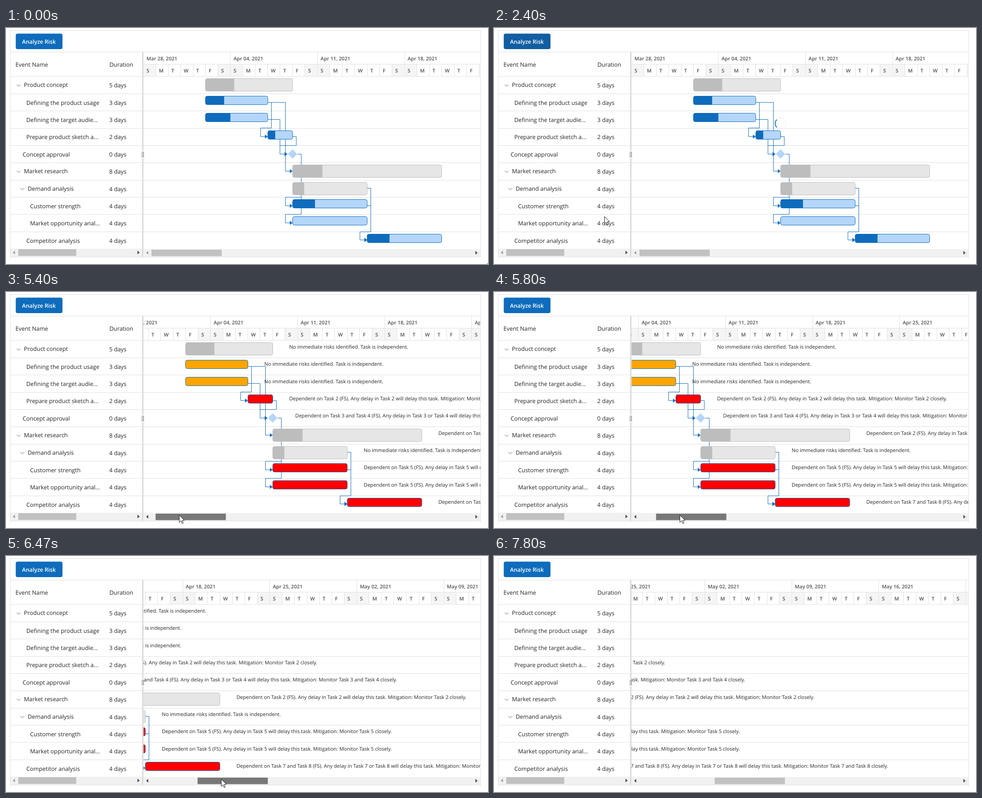
An HTML page with a canvas that plays this animation: 1067 px wide and 525 px high, repeating every 8940 ms.

```html
<!DOCTYPE html>
<html lang="en">
<head>
<meta charset="utf-8">
<title>Gantt risk analysis</title>
<style>
  html, body { margin: 0; width: 100%; height: 100%; overflow: hidden; background: #fff; }
  canvas { display: block; }
</style>
</head>
<body>
<canvas id="stage" width="1067" height="525"></canvas>
<script>
const ctx = document.getElementById('stage').getContext('2d');
ctx.textRendering = 'geometricPrecision';

const LOOP = 8940, STEP = 1000 / 15, SCROLL_RATIO = 4.81;
const LEFT = 304, RIGHT = 1050, DAY = 27.525, ROW_TOP = 107.95, ROW = 38.36;
const BLUE = '#0f6cbd', PALE = '#b4d6fa', INK = '#242424', LINE = '#e0e0e0';
const ARROW_ON = '#505050', ARROW_OFF = '#a3a3a3', THUMB = '#c1c1c1';
const FONT = '"Open Sans", "Noto Sans", sans-serif';

// start and end are days from Sunday, Mar 28; after holds the indices of the predecessors
const tasks = [
  { name: 'Product concept', level: 0, start: 5, end: 12, done: .33, parent: true },
  { name: 'Defining the product usage', level: 1, start: 5, end: 10, done: .3 },
  { name: 'Defining the target audie...', level: 1, start: 5, end: 10, done: .4 },
  { name: 'Prepare product sketch a...', level: 1, start: 10, end: 12, done: .3, after: [1] },
  { name: 'Concept approval', level: 0, start: 12, end: 12, milestone: true, after: [2, 3] },
  { name: 'Market research', level: 0, start: 12, end: 24, done: .2, parent: true, after: [1] },
  { name: 'Demand analysis', level: 1, start: 12, end: 18, done: .155, parent: true },
  { name: 'Customer strength', level: 2, start: 12, end: 18, done: .3, after: [4] },
  { name: 'Market opportunity anal...', level: 2, start: 12, end: 18, done: 0, after: [4] },
  { name: 'Competitor analysis', level: 1, start: 18, end: 24, done: .3, after: [6, 7] }
];
tasks.forEach((task, i) => {
  task.top = ROW_TOP + i * ROW;
  task.mid = task.top + 18.8;
  task.x = LEFT + task.start * DAY;
  task.width = (task.end - task.start) * DAY;
  task.days = 0;
  for (let d = task.start; d < task.end; d++) if (d % 7 % 6) task.days++;
  task.note = riskNote(task.after);
});

function riskNote(after) {
  if (!after) return 'No immediate risks identified. Task is independent.';
  const names = after.map(i => `Task ${i + 1}`), all = names.join(' and ');
  return `Dependent on ${all} (FS). Any delay in ${names.join(' or ')} will delay this task. Mitigation: Monitor ${all} closely.`;
}

// pointer moves: [from time, to time, x, y]; between them it rests
const moves = [
  [0, 200, 219, 243], [333, 1067, 95, 32], [1533, 2400, 244, 419],
  [2470, 3400, 302, 493], [4000, 4267, 377, 481], [4267, 4667, 374, 496]
];
// timeline drag: [time, scrolled pixels]
const drag = [[5267, 0], [5800, 177], [6467, 491], [7000, 700], [7400, 801]];

const progress = (t, from, to) => Math.min(1, Math.max(0, (t - from) / (to - from)));
const smooth = k => k * k * (3 - 2 * k);
const snap = v => Math.floor(v) + .5;

const scrollAt = t => Math.round(drag.slice(1).reduce((sum, [time, px], i) =>
  sum + (px - drag[i][1]) * progress(t, drag[i][0], time), 0));

function pointerAt(t) {
  let x = 1066, y = 523;
  for (const [from, to, toX, toY] of moves) {
    const k = smooth(progress(t, from, to));
    x += (toX - x) * k;
    y += (toY - y) * k;
  }
  return [Math.round(x + scrollAt(t) / SCROLL_RATIO), Math.round(y)];
}

function rect(x, y, w, h, fill) {
  ctx.fillStyle = fill;
  ctx.fillRect(x, y, w, h);
}
function text(s, x, y, size, fill = INK, weight = 400) {
  ctx.font = `${weight} ${size}px ${FONT}`;
  ctx.fillStyle = fill;
  ctx.fillText(s, x, Math.round(y));
}
function poly(points, fill, stroke, close = true) {
  ctx.beginPath();
  points.forEach(([x, y]) => ctx.lineTo(x, y));
  if (close) ctx.closePath();
  if (fill) { ctx.fillStyle = fill; ctx.fill(); }
  if (stroke) { ctx.strokeStyle = stroke; ctx.stroke(); }
}
function arc(radius, from, to, stroke, width) {
  ctx.beginPath();
  ctx.arc(634.5, 212.5, radius, from, to);
  ctx.strokeStyle = stroke;
  ctx.lineWidth = width;
  ctx.stroke();
}
const arrow = (x, y, dir, fill) => poly([[x + 3 * dir, y], [x - 2 * dir, y - 4], [x - 2 * dir, y + 4]], fill);

function bar(task, dy, h, fill, edge, doneFill) {
  const x = snap(task.x), y = snap(task.top + dy), w = snap(task.x + task.width) - x;
  ctx.beginPath();
  ctx.roundRect(x, y, w, h, 4);
  ctx.fillStyle = fill;
  ctx.fill();
  if (doneFill) {
    ctx.save();
    ctx.clip();
    rect(x, y, w * task.done, h, doneFill);
    ctx.restore();
  }
  ctx.strokeStyle = edge;
  ctx.stroke();
}

function drawTimeline() {
  const first = Date.UTC(2021, 2, 28);
  for (let d = 0; d < 70; d++) {
    const x = LEFT + d * DAY, px = Math.floor(x), weekday = d % 7;
    if (weekday % 6 === 0) rect(px, 81, DAY, 26, '#f5f5f5');
    if (d) rect(px, weekday ? 81 : 54, 1, weekday ? 26 : 53, LINE);
    text('SMTWTFS'[weekday], x + 7, 99, 11.2, ARROW_ON, 600);
    if (!weekday) {
      const date = new Date(first + d * 864e5);
      const month = ['Mar', 'Apr', 'May', 'Jun'][date.getUTCMonth() - 2];
      text(`${month} ${String(date.getUTCDate()).padStart(2, '0')}, 2021`, x + 7, 72, 11.1, ARROW_ON, 600);
    }
  }
}

// elbow from the end of one task to the start of another, with a detour when there is no room
function drawLink(from, to) {
  const inset = task => task.milestone ? 11.5 : 0;
  const startX = from.x + from.width + inset(from), tip = to.x - inset(to);
  const outX = startX + 8, backX = tip - 16;
  const detour = backX > outX ? [] : [[outX, from.mid], [outX, to.top - .1], [backX, to.top - .1]];
  const entry = detour.length ? [] : [[backX, from.mid]];
  const route = [[startX, from.mid], ...detour, ...entry, [backX, to.mid], [tip - 5, to.mid]];
  poly(route.map(point => point.map(snap)), null, BLUE, false);
  const y = snap(to.mid);
  poly([[tip, y], [tip - 6, y - 4.5], [tip - 6, y + 4.5]], BLUE);
}

function drawTask(task, analyzed) {
  const { x, mid } = task;
  if (task.milestone) {
    poly([[x, mid - 10.5], [x + 10.5, mid], [x, mid + 10.5], [x - 10.5, mid]], PALE);
  } else if (task.parent) {
    bar(task, 4.95, 28, '#e6e6e6', '#bdbdbd', '#bdbdbd');
  } else if (analyzed) {
    bar(task, 5.1, 19, task.after ? '#f00' : '#ffa500', BLUE);
  } else {
    bar(task, 5.1, 19, PALE, BLUE, BLUE);
  }
  if (analyzed) text(task.note, x + task.width + (task.milestone ? 50 : 36.6), task.top + 17.9, 11.1);
}

function drawGrid() {
  text('Event Name', 21, 86, 12.8);
  text('Duration', 229, 86, 12.8);
  tasks.forEach((task, i) => {
    const x = 36.8 + task.level * 8.2, y = 132.4 + i * ROW;
    text(task.name, task.parent ? x + 3 : x, task.parent ? y - 1 : y, 12.8);
    text(`${task.days} days`, 228.5, y, 12.8);
    if (task.parent) poly([[x - 13, y - 6.5], [x - 9, y - 2.5], [x - 5, y - 6.5]], null, '#616161', false);
  });
}

function drawScrollbars(thumb, thumbFill) {
  rect(10, 491, 291, 18, '#f1f1f1');
  rect(27, 492, 128.5, 15, THUMB);
  arrow(18, 499.5, -1, ARROW_OFF);
  arrow(293, 499.5, 1, ARROW_ON);
  rect(305, 492, 745, 17, '#f1f1f1');
  rect(322 + thumb, 493, 155.5, 14.5, thumbFill);
  arrow(313, 500, -1, thumb ? ARROW_ON : ARROW_OFF);
  arrow(1041, 500, 1, ARROW_ON);
}

function drawSpinner(t) {
  const turn = Math.PI + (t - 2400) / 1300 * Math.PI * 2;
  arc(12.5, 0, 7, '#ececec', 1);
  arc(12, turn - .8, turn + .8, BLUE, 1.8);
}

function drawPointer([x, y]) {
  const shape = [[0, 0], [0, 16], [3.8, 12.5], [6.5, 18.5], [9, 17.4], [6.3, 11.6], [11.5, 11.3]];
  ctx.lineWidth = 1;
  poly(shape.map(([dx, dy]) => [x + dx + .5, y + dy + .5]), '#fff', '#111');
}

function drawButton(fill) {
  ctx.beginPath();
  ctx.roundRect(21.6, 12.6, 103.4, 34.4, 4);
  ctx.fillStyle = fill;
  ctx.fill();
  text('Analyze Risk', 35.5, 35, 12.5, '#fff', 600);
}

function render(t) {
  const within = (from, to) => t >= from - 10 && t < to - 10;
  const scroll = scrollAt(t), analyzed = t >= 3460;
  rect(0, 0, 1067, 525, '#fff');
  ctx.lineWidth = 1;

  ctx.strokeStyle = LINE;
  ctx.strokeRect(9.5, 5.5, 1041, 504);
  rect(10, 53, 1040, 1, LINE);
  rect(305, 80, 745, 1, LINE);
  tasks.forEach(task => rect(10, Math.floor(task.top), 1040, 1, LINE));

  drawButton(within(1400, 1600) ? '#0f548c' : within(1000, 2600) ? '#115ea3' : BLUE);
  drawGrid();

  ctx.save();
  ctx.beginPath();
  ctx.rect(LEFT, 54, RIGHT - LEFT, 438);
  ctx.clip();
  ctx.translate(-scroll, 0);
  drawTimeline();
  tasks.forEach(task => (task.after || []).forEach(i => drawLink(tasks[i], task)));
  tasks.forEach(task => drawTask(task, analyzed));
  ctx.restore();

  drawScrollbars(scroll / SCROLL_RATIO,
    within(5070, 7733) ? '#787878' : within(4600, 7800) ? '#a8a8a8' : THUMB);

  // splitter with its handle
  rect(301, 54, 3.5, 455, '#dedede');
  rect(300, 273, 4, 17, '#fff');
  rect(301, 275, 1, 13, '#555');
  rect(304, 275, 1, 13, '#555');

  if (within(1600, 3470)) drawSpinner(t);
  if (within(0, 7800)) drawPointer(pointerAt(t));
}

function tick() {
  const t = performance.now() % LOOP;
  render(Math.floor((t + 4) / STEP) * STEP);
  requestAnimationFrame(tick);
}
tick();
</script>
</body>
</html>
```
